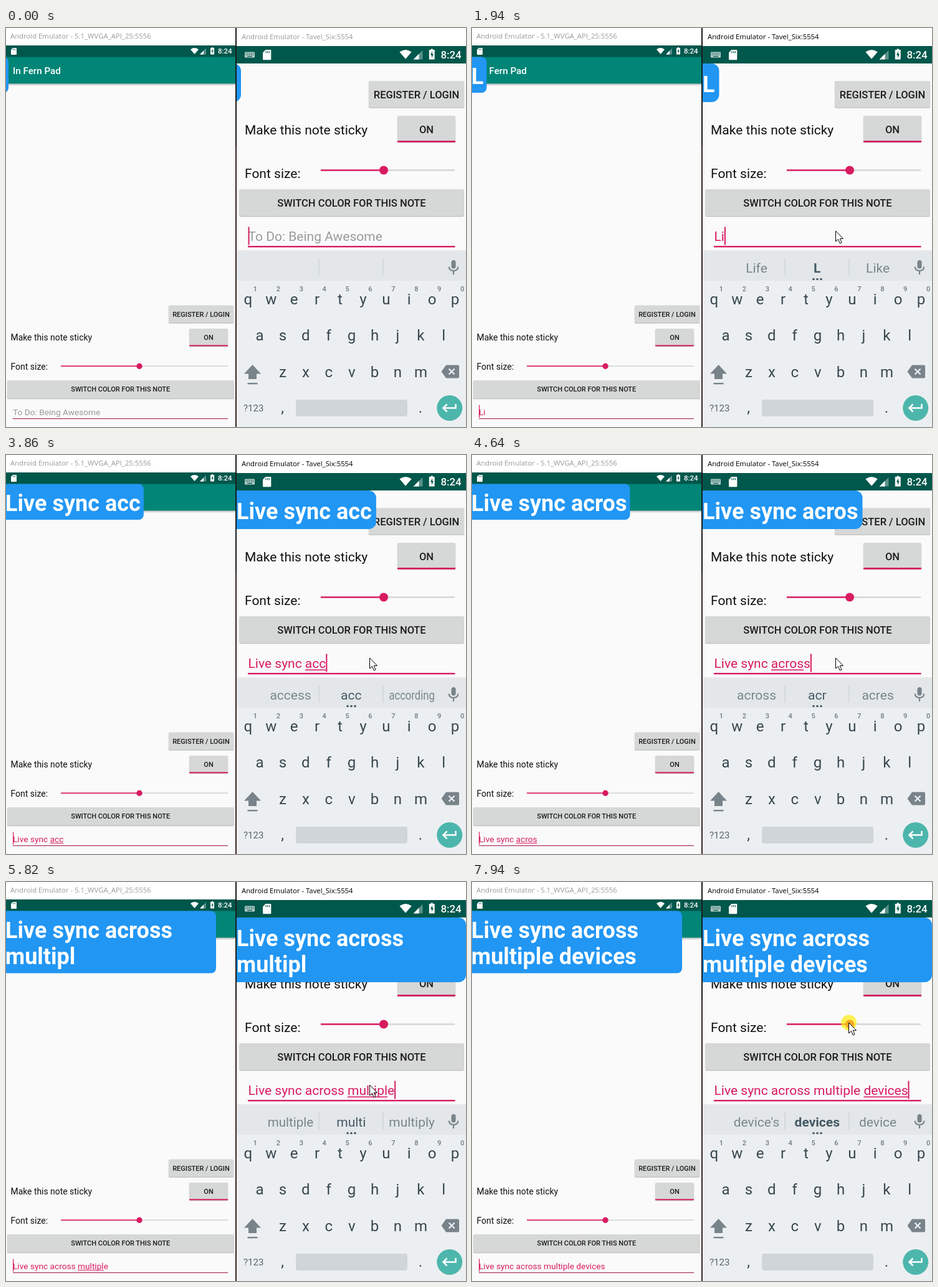
An HTML page that plays this animation: 738 px wide and 641 px high, repeating every 8 s.

```html
<!DOCTYPE html>
<html lang="en">
<head>
<meta charset="utf-8">
<title>Live sync</title>
<style>
html, body { margin: 0; width: 100%; height: 100%; overflow: hidden; background: #fafafa; }
svg { display: block; width: 738px; height: 641px; font-family: Roboto, sans-serif; }
text { white-space: pre; }
</style>
</head>
<body>
<svg id="stage" viewBox="0 0 738 641">
  <defs>
    <clipPath id="clipL"><rect x="0" y="46" width="368" height="595"/></clipPath>
    <clipPath id="clipR"><rect x="370" y="57" width="368" height="584"/></clipPath>
    <linearGradient id="fade" x2="0" y2="1">
      <stop stop-opacity=".25"/><stop offset="1" stop-opacity="0"/>
    </linearGradient>
  </defs>
  <g id="base"></g>
  <g id="live"></g>
</svg>
<script>
const LOOP = 8000, LAG = 80;
const PINK = '#d81b60', BLUE = '#2196f3', INK = '#37474f';
const HINT = 'To Do: Being Awesome';
const KEYS = 'Live sync acc<ross multiple devices'; // "<" is backspace

// [time, keys pressed so far]
const typedR = [[1530, 1], [1880, 2], [2830, 8], [3680, 13], [3950, 14], [5150, 21], [5290, 22], [6390, 34], [6560, 35]];
const typedL = [[1700, 1], [1900, 2], [2120, 3], [2970, 3.99], [2980, 5], [3180, 9], [3700, 13], [3990, 14], [5190, 21],
  [5310, 22], [6370, 33], [6560, 34], [6640, 35]];

// [time, left word, middle word, right word, middle is bold]
const hints = [
  [1690, 'Life', 'L', 'Like', 1], [2060, 'Life', 'Li', 'Like'], [2250, 'Love', 'Liv', 'Live'],
  [2600, 'a', 's', 'is'], [2990, 'sync', 'syn', 'syntax'], [3320, 'and', 'a', 'are', 1],
  [3640, 'access', 'acc', 'according'], [4060, 'across', 'acr', 'acres'], [4650, 'the', 'my', 'all'],
  [5060, 'me', 'm', 'more', 1], [5340, 'my', 'mu', 'much'], [5560, 'multiple', 'multi', 'multiply'],
  [5920, 'devices', 'and', 'users'], [6080, 'desk', 'de', 'dear'], [6300, 'device', 'devic', 'devices'],
  [6640, "device's", 'devices', 'device', 1]
];

const $ = id => document.getElementById(id);
const ctx = document.createElement('canvas').getContext('2d');
const measure = (s, size, weight = 400) => {
  ctx.font = `${weight} ${size}px Roboto, sans-serif`;
  return ctx.measureText(s).width;
};
const rect = (x, y, w, h, fill, more = '') => `<rect x="${x}" y="${y}" width="${w}" height="${h}" fill="${fill}" ${more}/>`;
const path = (d, fill, more = '') => `<path d="${d}" fill="${fill}" ${more}/>`;
const circle = (x, y, r, fill, more = '') => `<circle cx="${x}" cy="${y}" r="${r}" fill="${fill}" ${more}/>`;
const text = (s, x, y, size, fill, more = '') => `<text x="${x}" y="${y}" font-size="${size}" fill="${fill}" ${more}>${s}</text>`;
const MID = 'text-anchor="middle"', MEDIUM = 'font-weight="500"';

function button(label, x, y, w, h, size, base) {
  return rect(x, y + 1.5, w, h, '#000', 'rx="2" opacity=".14"') + rect(x - .5, y + .5, w + 1, h + .5, '#000', 'rx="2" opacity=".1"') +
    rect(x, y, w, h, '#d6d7d7', 'rx="2"') + text(label, x + w / 2, base, size, '#1c1c1c', `${MID} ${MEDIUM}`);
}

function slider(x0, x1, x2, y, weight, r) {
  return rect(x1, y - weight / 2, x2 - x1, weight, '#d6d6d6') + rect(x0, y - weight / 2, x1 - x0, weight, PINK) + circle(x1, y, r, PINK);
}

const sdCard = (x, y, s) => `<g transform="translate(${x} ${y}) scale(${s})">` +
  path('M3 0H8.2Q9 0 9 .8V10.2Q9 11 8.2 11H.8Q0 11 0 10.2V3Z', '#fff') +
  path('M3.4 1.5V3.5M5.2 1.5V3.5M7 1.5V3.5', 'none', 'stroke="#00574b" stroke-width=".8"') + '</g>';

// Drawn leftwards from the right end of a status bar
const statusIcons = (x, y, s, size, clock) => `<g transform="translate(${x} ${y}) scale(${s})">` +
  path('M-72 6.5Q-65.5 1.6-59 6.5L-65.5 14Z', '#fff') +
  path('M-47 4.5V14.5H-57Z', '#fff', 'opacity=".35"') + path('M-51 8.5V14.5H-57Z', '#fff') +
  path('M-38 3H-36V4H-34V14.5H-40V4H-38Z', '#fff') + path('M-36.4 5.6L-38.6 9.8H-37.2V13L-35.2 8.6H-36.5Z', '#00574b') +
  '</g>' + text('8:24', clock[0], clock[1], size, '#fff', MEDIUM);

function leftPhone() {
  return rect(0, 0, 368, 28, '#fff') +
    text('Android Emulator - 5.1_WVGA_API_25:5556', 7, 17, 11.33, '#999', 'font-family="Open Sans, sans-serif"') +
    rect(0, 28, 368, 19, '#00574b') + sdCard(8, 32, 1) + statusIcons(368, 28, 1, 11.5, [340, 41]) +
    rect(0, 46.5, 368, 43, '#008577') + rect(0, 89.5, 368, 4, 'url(#fade)') +
    text('In Fern Pad', 11, 74, 15.2, '#fff', MEDIUM) +
    button('REGISTER / LOGIN', 261, 445.5, 104, 28, 11, 463.5) +
    text('Make this note sticky', 7.5, 502, 13.9, '#111') +
    button('ON', 294, 483, 62, 28, 11, 501) + rect(294, 509.3, 62, 1.9, PINK) +
    text('Font size:', 7.5, 549, 14, '#111') + slider(88, 214, 356, 543.2, 1.7, 4.7) +
    button('SWITCH COLOR FOR THIS NOTE', 2, 566, 363.5, 29, 11, 584) +
    rect(11, 627, 345, 1.2, '#a8325f');
}

function rightPhone() {
  let keyIcon = rect(383, 38.5, 16, 9, '#b8d0cc', 'rx="1"');
  for (let i = 0; i < 10; i++) keyIcon += rect(384.5 + i % 5 * 2.8, 40 + (i > 4 ? 2.4 : 0), 1.6, 1.2, '#00574b');
  keyIcon += rect(387, 45, 8, 1.2, '#00574b');
  return rect(370, 0, 368, 29, '#fff') +
    rect(370, 29, 368, 28, '#00574b') + keyIcon + sdCard(412, 35, 1.48) + statusIcons(738, 29, 1.48, 16.8, [697.5, 49]) +
    button('REGISTER / LOGIN', 582, 85, 153, 42.5, 16.5, 113) +
    text('Make this note sticky', 383, 170.5, 21, '#111') +
    button('ON', 628, 141, 93, 42, 16.5, 169) + rect(628, 181, 93, 2.7, PINK) +
    text('Font size:', 383, 241, 21, '#111') + slider(505, 606, 720, 228.5, 2.5, 7) +
    button('SWITCH COLOR FOR THIS NOTE', 374.5, 259, 360, 43, 16.5, 287) +
    rect(388, 350, 332.5, 2.4, PINK);
}

function keyboard() {
  let out = rect(370, 357, 368, 3, '#000', 'opacity=".07"') + rect(370, 360, 368, 281, '#eceff1') + rect(370, 360, 368, 46, '#e3e7e9') +
    rect(501.5, 370, 1, 28, '#c6ccd0') + rect(604.5, 370, 1, 28, '#c6ccd0');
  const rows = [['qwertyuiop', 388.4, 444], ['asdfghjkl', 407, 502], ['zxcvbnm', 444, 561]];
  for (const [keys, x, y] of rows)
    [...keys].forEach((k, i) => out += text(k, x + i * 36.9, y, 24, INK, MID));
  [...'1234567890'].forEach((n, i) => out += text(n, 400 + i * 36.9, 422.5, 11, '#6b7a82', `${MID} ${MEDIUM}`));
  const gray = '#78838a';
  return out +
    rect(714.5, 373, 7, 13.5, gray, 'rx="3.5"') +
    path('M710.8 383.5Q711 390 718 390T725.2 383.5M718 390V396', 'none', `stroke="${gray}" stroke-width="2.2"`) +
    path('M395.5 541L409 555.5H402V564H389V555.5H382Z', gray) + rect(387.5, 570, 16, 2.4, gray) +
    path('M706 541.5H725Q727 541.5 727 543.5V560.5Q727 562.5 725 562.5H706L698.5 552Z', gray) +
    path('M710.5 547.5L719.5 556.5M719.5 547.5L710.5 556.5', 'none', 'stroke="#eceff1" stroke-width="2.3"') +
    text('?123', 381, 616, 15, '#56666e') + text(',', 443.5, 618, 24, INK, MID) + text('.', 665, 618, 24, INK, MID) +
    rect(465, 597, 179, 27, '#cfd5d8', 'rx="4"') + circle(711.7, 610.5, 20.5, '#4db6ac') +
    path('M721.5 604V610.5H702M707.5 604.5L701.5 610.5L707.5 616.5', 'none', 'stroke="#fff" stroke-width="2.5"');
}

$('base').innerHTML = rect(0, 0, 738, 641, '#fafafa') + leftPhone() + rightPhone() + keyboard() +
  rect(368, 0, 2, 641, '#1b1b1d') + rect(368.5, 190, 1, 451, '#54302b');

function pressed(points, t) {
  if (t < points[0][0]) return 0;
  const i = points.findIndex(p => p[0] > t);
  if (i < 0) return points[points.length - 1][1];
  const [t0, k0] = points[i - 1], [t1, k1] = points[i];
  return Math.floor(k0 + (k1 - k0) * (t - t0) / (t1 - t0));
}

function pressTime(points, k) {
  const i = points.findIndex(p => p[1] >= k);
  if (!i) return points[0][0];
  const [t0, k0] = points[i - 1], [t1, k1] = points[i];
  return t0 + (t1 - t0) * (k - k0) / (k1 - k0);
}

const content = k => [...KEYS.slice(0, k)].reduce((s, c) => c === '<' ? s.slice(0, -1) : s + c, '');

const left = {
  typed: typedL, phase: -600, clip: 'clipL', x: 11, base: 621.5, size: 13.7, caret: [605.5, 20.5, 1.2], line: 1,
  note: { x: 0, tx: -1, y: 46.5, pad: 4, max: 337, h: 57.5, h2: 100, r: 8, base: 90 },
  marks: t => t < 6720, fixedCaret: true
};
const right = {
  typed: typedR, phase: -300, clip: 'clipR', x: 388.5, base: 342, size: 21, caret: [319.5, 29, 2], line: 1.6,
  note: { x: 370, tx: 370, y: 57, pad: 7, max: 368, h: 62, h2: 104, r: 12, base: 102.5 },
  marks: (t, k) => k > 9, fixedCaret: false
};

function note(n, s) {
  const width = measure(s, 36, 700) + n.pad;
  const cut = width > n.max ? s.indexOf('multi') < 0 ? s.lastIndexOf(' ') : s.indexOf(' mul') : -1;
  const lines = cut < 0 ? [s] : [s.slice(0, cut), s.slice(cut + 1)];
  return rect(n.x - 30, n.y, (cut < 0 ? width : n.max) + 30, cut < 0 ? n.h : n.h2, BLUE, `rx="${n.r}"`) +
    lines.map((l, i) => text(l, n.tx, n.base + i * 42.2, 36, '#fff', 'font-weight="700"')).join('');
}

function device(d, t) {
  const k = pressed(d.typed, t), s = content(k), old = content(pressed(d.typed, t - LAG));
  const since = t - (k ? pressTime(d.typed, k) : d.phase);
  let out = text(s || HINT, d.x, d.base, d.size, s ? PINK : '#9b9b9b');
  const start = old.lastIndexOf(' ') + 1;
  if (old.length - start > 1 && s.startsWith(old) && d.marks(t, k)) {
    const x = measure(old.slice(0, start), d.size);
    out += rect(d.x + x, d.base + d.size * .12, measure(old, d.size) - x, d.line, PINK);
  }
  if (since % 1000 < 500) {
    const x = d.x + (d.fixedCaret ? 0 : measure(s, d.size));
    out += rect(x, d.caret[0], d.caret[2], d.caret[1], PINK);
  }
  return `<g clip-path="url(#${d.clip})">${out}${note(d.note, old)}</g>`;
}

function suggestions(t) {
  const row = hints.filter(h => h[0] <= t).pop();
  if (!row) return '';
  return row.slice(1, 4).map((word, i) => {
    const weight = i === 1 && row[4] ? 700 : 400;
    const fit = Math.min(1, 73.5 / measure(word, 21, weight));
    return `<g transform="translate(${456.5 + i * 97.3} 393) scale(${fit} 1)">` +
      text(word, 0, 0, 21, i === 1 ? '#455a64' : '#78868d', `${MID} font-weight="${weight}"`) + '</g>';
  }).join('') + [548, 554, 560].map(x => circle(x, 403.5, 1.8, '#455a64')).join('');
}

function pointer(t) {
  if (t < 480) return '';
  const ease = (a, b) => {
    const p = Math.max(0, Math.min(1, (t - a) / (b - a)));
    return p * p * (3 - 2 * p);
  };
  const a = ease(480, 790), b = ease(7180, 7580);
  const x = 647 - 63.5 * a + 21 * b, y = 600 - 274 * a - 100 * b;
  const click = t > 930 && t < 1110 || t > 7760;
  return (click ? circle(x, y, 12.5, '#ffeb00', 'opacity=".68"') : '') +
    path('M0 0V17L4 13.3L6.7 20L9.5 18.8L6.8 12.4H12Z', '#fff', `stroke="#000" transform="translate(${x} ${y})"`);
}

function render(t) {
  const title = text('Android Emulator - Tavel_Six:5554', 378, 17.5, 11.33, t < 1000 ? '#999' : '#000', 'font-family="Open Sans, sans-serif"');
  $('live').innerHTML = title + device(left, t) + device(right, t) + suggestions(t) + pointer(t);
}

const begin = performance.now();
function tick() {
  render((performance.now() - begin) % LOOP);
  requestAnimationFrame(tick);
}
tick();
</script>
</body>
</html>
```
